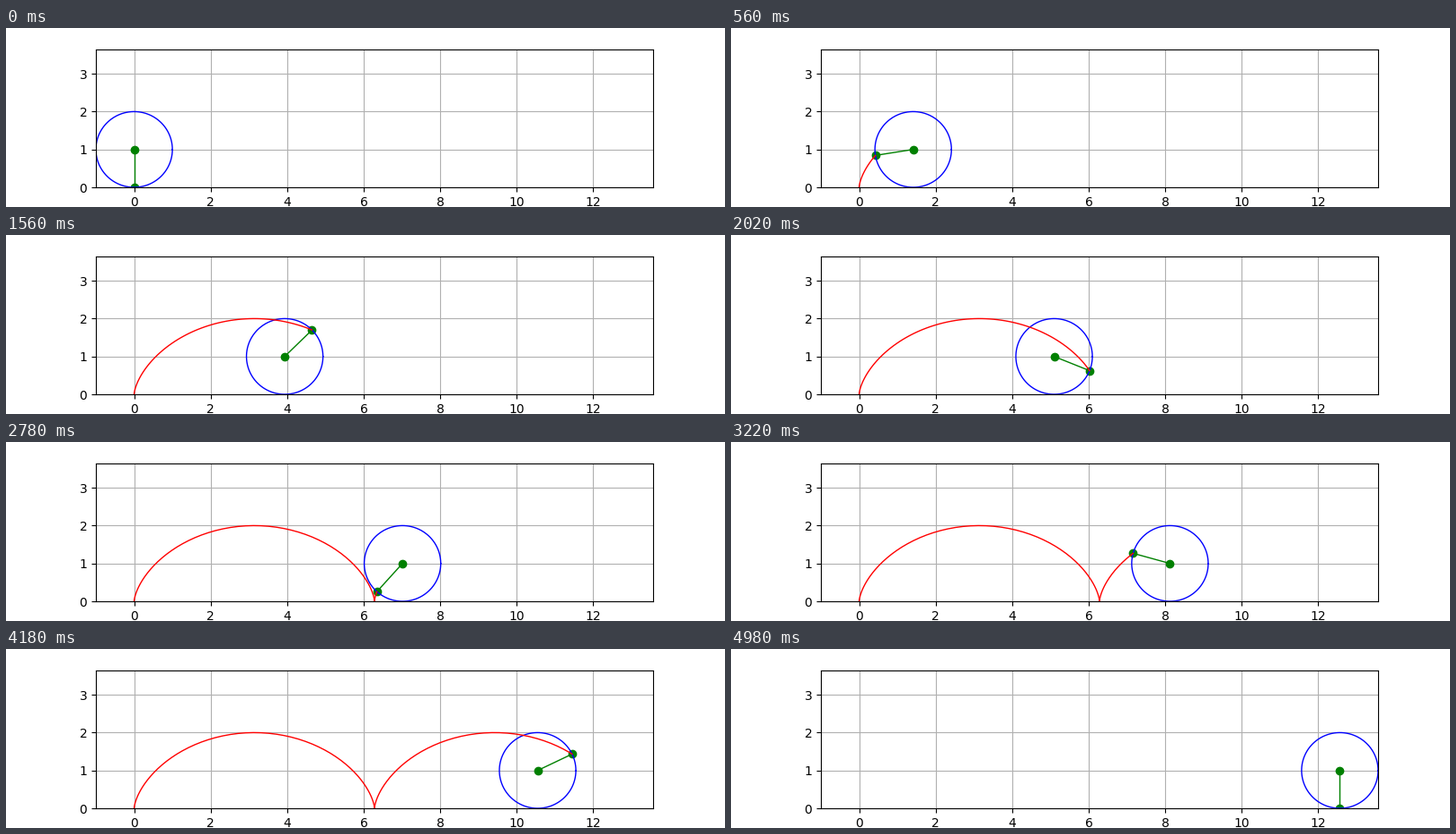
A matplotlib script for the animation above (5 s loop, 800 by 200 pixels).

```python
import numpy as np
import matplotlib.pyplot as plt
from matplotlib.animation import FuncAnimation

N = 250
R = 1.0
W, H = 8, 2
theta = np.linspace(0, 4 * np.pi, N)
x = R * (theta - np.sin(theta))
y = R * (1 - np.cos(theta))

phi = np.linspace(0, 2 * np.pi, 100)
rim_x, rim_y = R * np.cos(phi), R + R * np.sin(phi)

fig, ax = plt.subplots(figsize=(W, H), dpi=100)
x_min, x_max = -R, R * theta[-1] + R
ax.set_xlim(x_min, x_max)
ax.set_ylim(0, (x_max - x_min) * H / W)
ax.grid(True)

spoke, = ax.plot([], [], "go-", lw=1)
wheel, = ax.plot([], [], "b-", lw=1)
trail, = ax.plot([], [], "r-", lw=1)


def update(i):
    cx = R * theta[i]
    wheel.set_data(cx + rim_x, rim_y)
    spoke.set_data([cx, x[i]], [R, y[i]])
    # the trail is wiped on the last step
    n = (i + 1) % N
    trail.set_data(x[:n], y[:n])
    return spoke, wheel, trail


anim = FuncAnimation(fig, update, frames=N, interval=20, repeat=True,
                     repeat_delay=0, blit=False)
plt.show()
```
